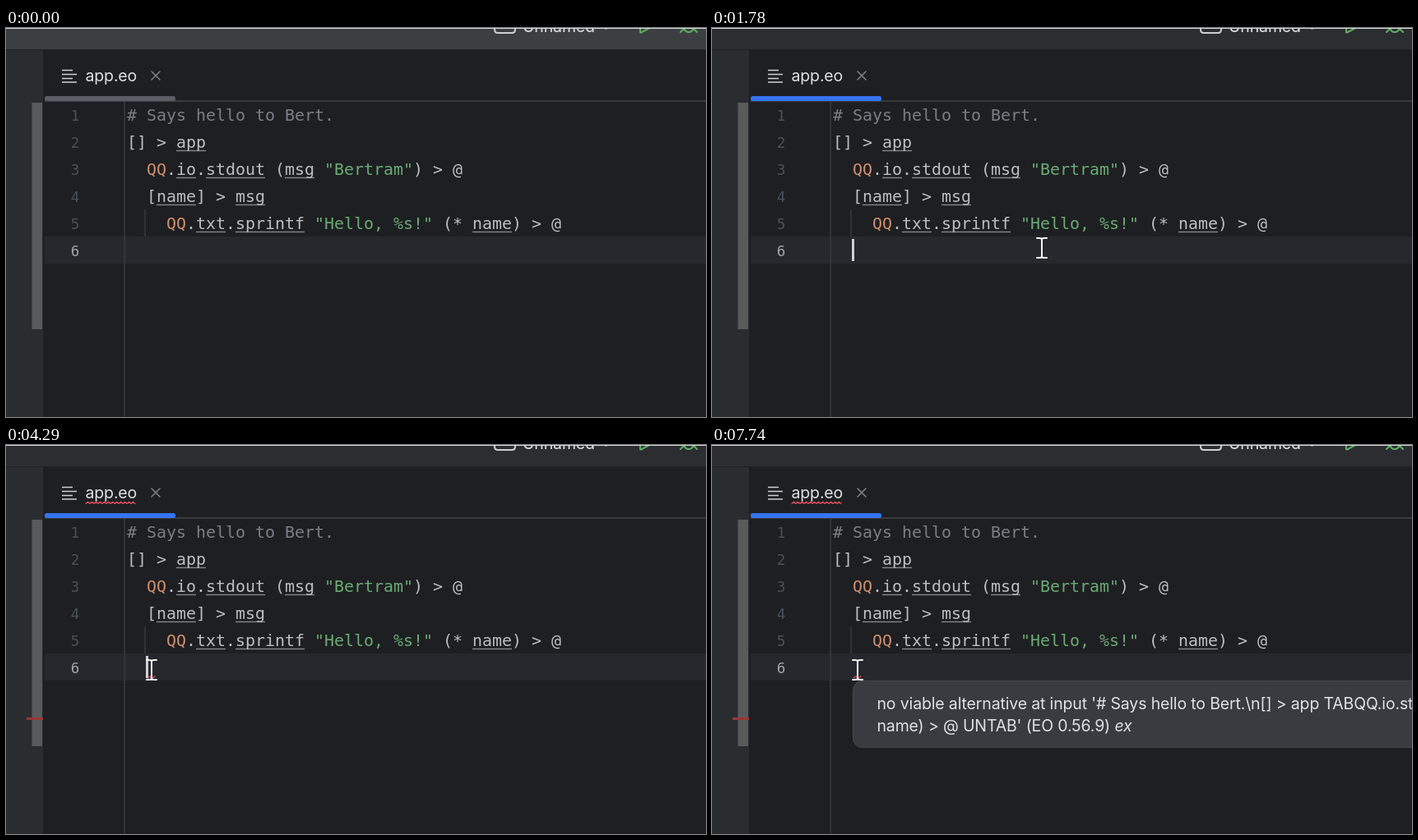
Animation, 851 px wide and 474 px high, one loop 8000 ms. Source, as an HTML page:

```html
<!DOCTYPE html>
<html lang="en">
<head>
<meta charset="utf-8">
<title>Editor error tooltip</title>
<style>
  html, body { margin: 0; width: 100%; height: 100%; overflow: hidden; background: #1e1f22; }
  svg { display: block; width: 100vw; height: 100vh; }
  text { white-space: pre; }
  .ui { font: 19.5px Inter, "Open Sans", sans-serif; font-optical-sizing: none; letter-spacing: -.15px; fill: #dfe1e5; }
  .code { font: 19.93px "DejaVu Sans Mono", "Noto Sans Mono", monospace; fill: #bcbec4; }
  .code .comment { fill: #7a7e85; }
  .code .root { fill: #cf8e6d; }
  .code .string { fill: #6aab73; }
  .num { font: 17.5px "DejaVu Sans Mono", "Noto Sans Mono", monospace; fill: #4b5059; text-anchor: middle; }
  .num.current { fill: #a1a3ab; }
  .line { fill: none; stroke-linecap: round; stroke-linejoin: round; }
</style>
</head>
<body>
<svg viewBox="0 0 851 474">
  <rect width="851" height="474" fill="#1e1f22"/>
  <rect id="bar" width="851" height="26"/>
  <g class="line" stroke="#ced0d6" stroke-width="2">
    <path d="M594 -8V2Q594 6 598 6H615Q619 6 619 2V-8"/>
    <path d="M725 -3L729.500 1L734 -3" stroke="#9da0a8"/>
  </g>
  <text class="ui" x="628" y="5">Unnamed</text>
  <g class="line" stroke="#5fad65" stroke-width="2">
    <path d="M771 -9V5Q771 6 773 5L788 -3"/>
    <path d="M824 -4Q824 5 830 5Q836 5 836 -4M824 1L820 5M836 1L840 5"/>
  </g>
  <rect width="851" height="1" fill="#d6d8da"/>

  <rect y="27" width="45" height="447" fill="#2a2d30"/>
  <rect x="31.500" y="91" width="12.500" height="276" fill="#595a5b"/>
  <rect id="stripe" x="25" y="332" width="20" height="3" fill="#9c3533"/>

  <path d="M68 51.500H81M68 56.500H86M68 61.500H81M68 66H86" stroke="#ced0d6" stroke-width="1.600"/>
  <text class="ui" x="96.500" y="65">app.eo</text>
  <path id="tabWave" class="line" stroke="#e0525e" stroke-width="1.200"/>
  <path class="line" d="M177 53L187 63M187 53L177 63" stroke="#80838a" stroke-width="1.500"/>
  <rect x="47" y="88" width="804" height="2" fill="#393b40"/>
  <rect id="tab" x="47" y="83" width="159" height="6" rx="2.500"/>

  <rect x="47" y="254" width="804" height="33" fill="#26282e"/>
  <rect x="143.300" y="90" width="1.600" height="384" fill="#36383d"/>
  <rect x="168.300" y="221" width="1.500" height="33" fill="#36383d"/>
  <g id="code"></g>

  <path id="codeWave" class="line" stroke="#e0525e" stroke-width="1.300"/>
  <rect id="caret" x="170" y="257" width="3" height="27" fill="#ced0d6"/>
  <g id="tip">
    <rect x="171.500" y="287.500" width="720" height="81" rx="11" fill="#393b40" stroke="#45474c"/>
    <text class="ui" x="200.500" y="322">no viable alternative at input '# Says hello to Bert.\n[] &gt; app TABQQ.io.stdout</text>
    <text class="ui" x="200.500" y="349">name) &gt; @ UNTAB' (EO 0.56.9) <tspan font-style="italic">ex</tspan></text>
  </g>
  <path id="mouse" class="line" d="M-6 -12H-3Q0 -12 0 -10Q0 -12 3 -12H6M0 -10V10M-6 12H-3Q0 12 0 10Q0 12 3 12H6" stroke="#f2f2f2" stroke-width="2"/>
</svg>
<script>
const LOOP = 8000, STEP = 66;
const CHAR = 12, LEFT = 147, FIRST = 113, PITCH = 33;
const $ = id => document.getElementById(id);

// Each line: indent, then tokens; c = comment, r = root, s = string, u = underlined
const LINES = [
  [0, "c:# Says hello to Bert."],
  [0, "[]", " > ", "u:app"],
  [2, "r:QQ", ".", "u:io", ".", "u:stdout", " (", "u:msg", " ", 's:"Bertram"', ") > @"],
  [2, "[", "u:name", "] > ", "u:msg"],
  [4, "r:QQ", ".", "u:txt", ".", "u:sprintf", " ", 's:"Hello, %s!"', " (* ", "u:name", ") > @"],
  [2]
];
const KINDS = { c: "comment", r: "root", s: "string", u: "under" };

function add(tag, attrs, content = "") {
  const el = document.createElementNS("http://www.w3.org/2000/svg", tag);
  for (const key in attrs) el.setAttribute(key, attrs[key]);
  el.textContent = content;
  $("code").append(el);
}

LINES.forEach(([indent, ...tokens], row) => {
  const y = FIRST + row * PITCH;
  add("text", { class: row === 5 ? "num current" : "num", x: 84, y }, row + 1);
  let col = indent;
  for (const token of tokens) {
    const tagged = /^[crsu]:/.test(token);
    const kind = tagged ? KINDS[token[0]] : "";
    const word = tagged ? token.slice(2) : token;
    const x = LEFT + col * CHAR;
    const lead = word.length - word.trimStart().length;
    const group = { class: "code", x: x + lead * CHAR, y };
    if (kind === "under") {
      add("rect", { x, y: y + 2.8, width: word.length * CHAR, height: 1.4, fill: "#83858b" });
    }
    add("text", group, "");
    const tspan = document.createElementNS("http://www.w3.org/2000/svg", "tspan");
    tspan.setAttribute("class", kind);
    tspan.textContent = word.trim();
    $("code").lastChild.append(tspan);
    col += word.length;
  }
});

function wave(x, end, y, half) {
  let d = `M${x} ${y}`;
  for (let i = 1; x + i * half <= end; i++) d += `L${x + i * half} ${y + (i % 2 ? -2.2 : 0)}`;
  return d;
}
$("tabWave").setAttribute("d", wave(97, 159, 71.5, 2.5));
$("codeWave").setAttribute("d", wave(172, 181, 284, 3));

// Pointer moves: start time, number of steps, from, to
const MOVES = [
  [130, 2, [541, 393], [490, 354]],
  [1180, 9, [490, 354], [401, 268], true],
  [3140, 5, [398, 269], [326, 313]],
  [3480, 8, [326, 313], [188, 280]],
  [4010, 4, [188, 280], [177, 274]]
];
const CARET_ON = [[1780, 2250], [2520, 3790], [4290, 4760], [5290, 5760], [6290, 6750], [7280, 7740]];

function pointerAt(t) {
  if (t < 130 || (t >= 2050 && t < 3140)) return null;
  const [start, steps, from, to, early] = MOVES.filter(m => t >= m[0]).pop();
  const done = Math.floor((t - start) / STEP) + (early ? 1 : 0);
  const p = Math.min(1, done / steps);
  return from.map((v, i) => Math.round(v + (to[i] - v) * p));
}

function show(id, on) { $(id).style.display = on ? "" : "none"; }

function draw(t) {
  const focused = t >= 1780;
  $("bar").setAttribute("fill", focused ? "#2b2d30" : "#3c3f41");
  $("tab").setAttribute("fill", focused ? "#3574f0" : "#5a5d63");
  show("tabWave", t >= 2250);
  show("stripe", t >= 2250);
  show("codeWave", t >= 3140);
  show("caret", CARET_ON.some(([a, b]) => t >= a && t < b));
  show("tip", t >= 4760);
  const at = pointerAt(t);
  show("mouse", at);
  if (at) $("mouse").setAttribute("transform", `translate(${at})`);
}

const begin = performance.now();
function tick() {
  draw((performance.now() - begin) % LOOP);
  requestAnimationFrame(tick);
}
draw(0);
tick();
</script>
</body>
</html>
```
